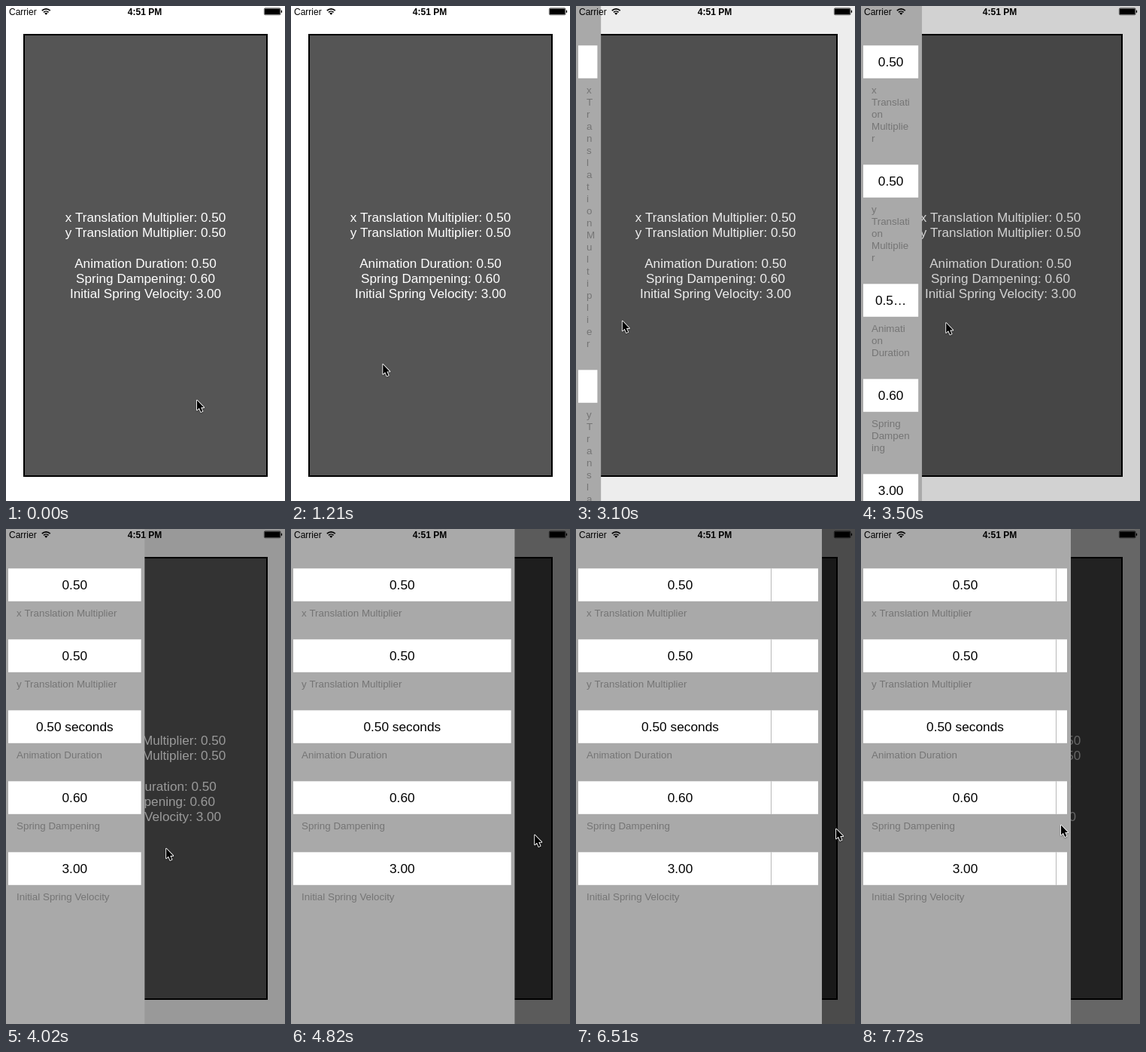
Recreate the animation shown at these times as an HTML page with a canvas. Size 371 px wide and 656 px high, loop 8 s.

```html
<!DOCTYPE html>
<html lang="en">
<head>
<meta charset="utf-8">
<title>Side menu drag</title>
<style>
html, body { margin: 0; width: 100%; height: 100%; overflow: hidden; background: #fff; }
canvas { display: block; width: 371px; height: 656px; }
</style>
</head>
<body>
<canvas id="stage"></canvas>
<script>
const WIDTH = 371, HEIGHT = 656, LOOP = 8000;
const RELEASE = 6510, OPEN_WIDTH = 279, DRAG_WIDTH = 327;
const FONT = '"Liberation Sans", Arial, sans-serif';
const ROWS = [
  ['0.50', 'x Translation Multiplier'],
  ['0.50', 'y Translation Multiplier'],
  ['0.50 seconds', 'Animation Duration'],
  ['0.60', 'Spring Dampening'],
  ['3.00', 'Initial Spring Velocity']
];
const SUMMARY = [
  'x Translation Multiplier: 0.50', 'y Translation Multiplier: 0.50', '',
  'Animation Duration: 0.50', 'Spring Dampening: 0.60', 'Initial Spring Velocity: 3.00'
];

// [time, x, y] of the pointer while it drags
const POINTER = [
  [1600, 0, 414], [1690, 0, 414], [1810, 3, 413], [2440, 3, 413], [2470, 4, 412],
  [2800, 28, 414], [3250, 77, 417], [3500, 112, 418.5], [4020, 212, 422],
  [4080, 218, 421.5], [4820, 323, 404], [4930, 338, 400], [5290, 343, 398], [5920, 345, 396]
];
// [time, width] of the menu while it is dragged
const MENU = [
  [2470, 0], [2650, 1], [2800, 8], [3250, 46], [3500, 81], [4020, 184.5],
  [4080, 191], [4820, 297.5], [4930, 313], [5290, 323], [5920, DRAG_WIDTH]
];

// Letter widths in em, used to break labels into lines
const EM = {
  ' ': .278, i: .222, l: .222, r: .333, t: .315, a: .537, e: .537, o: .574, p: .593,
  s: .5, x: .519, y: .5, c: .537, m: .853, g: .574, T: .56, A: .648, D: .704,
  S: .648, M: .87, V: .611, I: .259
};

const canvas = document.getElementById('stage');
const ctx = canvas.getContext('2d');
const dpr = window.devicePixelRatio || 1;
canvas.width = WIDTH * dpr;
canvas.height = HEIGHT * dpr;
ctx.scale(dpr, dpr);

const clamp01 = v => Math.max(0, Math.min(1, v));
const smooth = v => v * v * (3 - 2 * v);

function track(keys, t, i) {
  if (t <= keys[0][0]) return keys[0][i];
  for (let k = 1; k < keys.length; k++) {
    const a = keys[k - 1], b = keys[k];
    if (t <= b[0]) return a[i] + (b[i] - a[i]) * (t - a[0]) / (b[0] - a[0]);
  }
  return keys[keys.length - 1][i];
}

function pointerAt(t) {
  if (t < 1600) {
    const u = 1 - smooth(clamp01((t - 800) / 800));
    return [253 * u, 414 + 107 * Math.pow(u, .8)];
  }
  const back = smooth(clamp01((t - 7170) / 550));
  return [track(POINTER, t, 1) - 80 * back, track(POINTER, t, 2) - 5 * back];
}

function menuWidthAt(t) {
  if (t < RELEASE) return track(MENU, t, 1);
  const s = (t - RELEASE) / 1000, decay = 18, freq = 24;
  const swing = Math.cos(freq * s) + decay / freq * Math.sin(freq * s);
  return OPEN_WIDTH + (DRAG_WIDTH - OPEN_WIDTH) * Math.exp(-decay * s) * swing;
}

function rect(x, y, w, h, color) {
  ctx.fillStyle = color;
  ctx.fillRect(x, y, w, h);
}

function text(str, x, y, size, color, align = 'left', weight = '') {
  ctx.font = `${weight} ${size}px ${FONT}`;
  ctx.textAlign = align;
  ctx.fillStyle = color;
  ctx.fillText(str, x, y);
}

const emWidth = str => [...str].reduce((sum, c) => sum + (EM[c] || .556), 0);

// Breaks at spaces, and inside words that are too long for a line
function wrap(label, room) {
  const lines = [];
  let line = '';
  for (const word of label.split(' ')) {
    const joined = line ? line + ' ' + word : word;
    if (emWidth(joined) <= room) { line = joined; continue; }
    if (line) lines.push(line);
    line = '';
    for (const c of word) {
      if (line && emWidth(line + c) > room) { lines.push(line); line = ''; }
      line += c;
    }
  }
  lines.push(line);
  return lines;
}

function ellipsize(str, room) {
  ctx.font = `17.3px ${FONT}`;
  const fits = s => ctx.measureText(s).width <= room;
  if (fits(str)) return str;
  while (str && !fits(str + '…')) str = str.slice(0, -1);
  return fits(str + '…') ? str + '…' : '';
}

function drawPage() {
  rect(0, 0, WIDTH, HEIGHT, '#fff');
  rect(23, 37, 325, 587, '#000');
  rect(25, 39, 321, 583, '#555');
  SUMMARY.forEach((s, i) => text(s, 185.5, 286.2 + i * 20.2, 17.15, '#fff', 'center'));
}

function drawMenu(width, released) {
  const layout = released ? OPEN_WIDTH : width;
  ctx.save();
  ctx.beginPath();
  ctx.rect(0, 0, width, HEIGHT);
  ctx.clip();
  rect(0, 0, width, HEIGHT, '#a9a9a9');
  let y = 52.3;
  for (const [value, label] of ROWS) {
    if (y > HEIGHT) break;
    rect(3, y, Math.max(0, width - 8), 43.5, '#fff');
    if (released) rect(259, y, 1, 43.5, '#b8b8b8');
    text(ellipsize(value, layout - 38), (layout - 2) / 2, y + 27.8, 17.3, '#000', 'center');
    const lines = wrap(label, (layout - 28.5) / 13.85);
    lines.forEach((s, i) => text(s, 14, y + 63.8 + i * 16, 13.4, '#757575'));
    y += 94 + (lines.length - 1) * 16;
  }
  ctx.restore();
}

function drawWifi() {
  ctx.strokeStyle = ctx.fillStyle = '#000';
  ctx.lineWidth = 1.7;
  for (const r of [4.6, 7.7]) {
    ctx.beginPath();
    ctx.arc(53.3, 11.6, r, -Math.PI * .75, -Math.PI * .25);
    ctx.stroke();
  }
  ctx.beginPath();
  ctx.moveTo(53.3, 11.8);
  ctx.arc(53.3, 11.8, 2.9, -Math.PI * .75, -Math.PI * .25);
  ctx.fill();
}

function drawStatus() {
  text('Carrier', 4, 11.6, 12, '#000');
  text('4:51 PM', 184.5, 11.6, 12, '#000', 'center', 'bold');
  drawWifi();
  ctx.lineWidth = .6;
  ctx.beginPath();
  ctx.roundRect(343.3, 2.8, 21.8, 9, 1.5);
  ctx.stroke();
  rect(344, 3.5, 20.4, 7.6, '#000');
  rect(365.8, 5.8, 1.3, 3, '#000');
}

function drawPointer([x, y]) {
  ctx.save();
  ctx.translate(x, y);
  const arrow = new Path2D('M1 1.6V14.4L3.9 11.8L6.2 17L8.4 16L6.2 11H10.1Z');
  ctx.lineJoin = 'round';
  ctx.lineWidth = 1.8;
  ctx.strokeStyle = '#fff';
  ctx.shadowColor = 'rgba(0,0,0,.35)';
  ctx.shadowBlur = 2 * dpr;
  ctx.shadowOffsetY = dpr;
  ctx.stroke(arrow);
  ctx.shadowColor = 'transparent';
  ctx.fillStyle = '#000';
  ctx.fill(arrow);
  ctx.restore();
}

function draw(t) {
  const width = menuWidthAt(t);
  drawPage();
  if (width > 0) {
    rect(0, 0, WIDTH, HEIGHT, `rgba(0,0,0,${.8 * width / WIDTH})`);
    drawMenu(width, t >= RELEASE);
  }
  drawStatus();
  drawPointer(pointerAt(t));
}

const start = performance.now();
function tick() {
  draw((performance.now() - start) % LOOP);
  requestAnimationFrame(tick);
}
tick();
</script>
</body>
</html>
```
